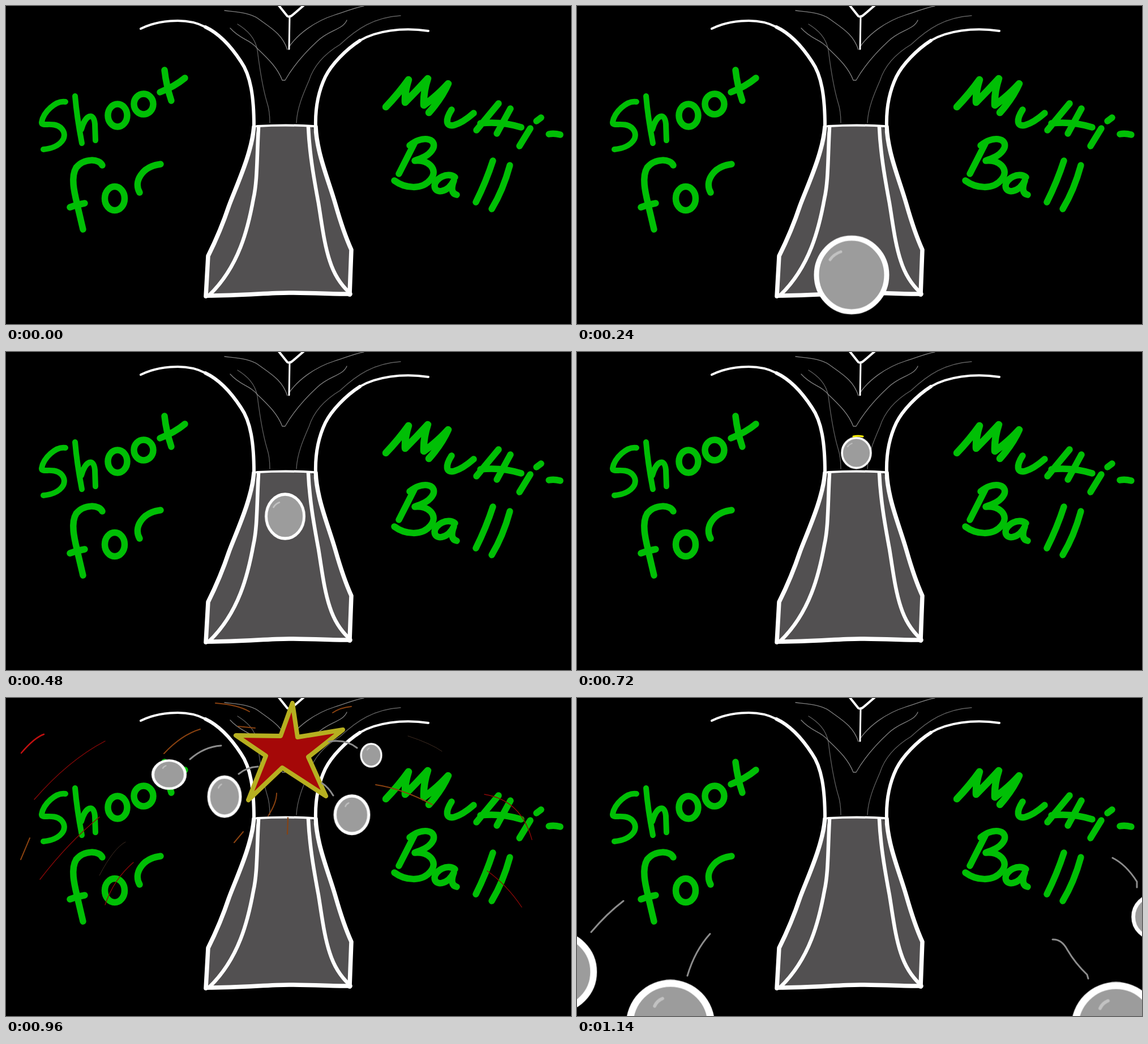
An HTML page without scripts that plays this animation: 998x561 px, repeating every 1.2 s.

```html
<!DOCTYPE html>
<html lang="en">
<head>
<meta charset="utf-8">
<title>Shoot for Multi-Ball</title>
<style>
html, body { margin: 0; width: 100%; height: 100%; overflow: hidden; background: #000; }
svg { display: block; width: 100%; height: 100%; fill: none; stroke-linecap: round; stroke-linejoin: round; }
.wall { stroke: #fff; }
.thin { stroke: #808080; stroke-width: 1.3; }
.ink { stroke: #00bf05; stroke-width: 11.5; }
.trail { stroke: #8c8c8c; stroke-width: 3; }
.body { fill: #9c9c9c; stroke: #fff; }
.shine { stroke: #c2c2c2; stroke-width: 5; }
.yellow { stroke: #fff200; }
.orange { stroke: #ff5a00; }
.brown { stroke: #8a4210; stroke-width: 2; }
.red { stroke: #8e0808; stroke-width: 1.3; }
.hot { fill: #f00; stroke: #ff0; stroke-width: 11; }
.warm { fill: #d20505; stroke: #dcd612; stroke-width: 9; }
.dim { fill: #a50808; stroke: #b6af20; stroke-width: 8; }

/* Each .at is visible for one 60 ms step, number --i of 20 */
.at { opacity: 0; animation: flash 1.2s step-end infinite; animation-delay: calc(var(--i) * 60ms - 1200ms); }
@keyframes flash { 0% { opacity: 1 } 5%, 100% { opacity: 0 } }

.move { animation: 1.2s step-end infinite; transform: scale(0); stroke-width: 9; }
.fly { stroke-width: 11; }
.roll { animation-name: roll; }
.l1 { animation-name: l1; }
.l2 { animation-name: l2; }
.r1 { animation-name: r1; }
.r2 { animation-name: r2; }
@keyframes roll {
  0%  { transform: scale(0) }
  5%  { transform: translate(484px, 636px) scale(1.25) }
  10% { transform: translate(484px, 580px) scale(1.16) }
  15% { transform: translate(484px, 526px) scale(1.08) }
  20% { transform: translate(485px, 474.5px) scale(1) }
  25% { transform: translate(487px, 424px) scale(.87, .88) }
  30% { transform: translate(489px, 376px) scale(.75, .78) }
  35% { transform: translate(491px, 332px) scale(.64, .69) }
  40% { transform: translate(493px, 290px) scale(.54, .6) }
  45% { transform: translate(493px, 256px) scale(.5, .55) }
  50% { transform: translate(493px, 226px) scale(.47, .5) }
  55% { transform: translate(493px, 200px) scale(.44, .45) }
  60% { transform: translate(493.5px, 178px) scale(.41) }
  65%, 100% { transform: scale(0) }
}
@keyframes l1 {
  0%  { transform: scale(0) }
  75% { transform: translate(385px, 118px) scale(.3) }
  80% { transform: translate(288px, 135px) scale(.46, .38) }
  85% { transform: translate(193px, 185px) scale(.62, .58) }
  90% { transform: translate(88px, 305px) scale(.82) }
  95%, 100% { transform: translate(-37px, 483px) scale(1.07, 1.03) }
}
@keyframes l2 {
  0%  { transform: scale(0) }
  75% { transform: translate(435px, 145px) scale(.3) }
  80% { transform: translate(386px, 174px) scale(.45, .53) }
  85% { transform: translate(322px, 240px) scale(.68) }
  90% { transform: translate(245px, 380px) scale(.92) }
  95%, 100% { transform: translate(165px, 576px) scale(1.16, 1.12) }
}
@keyframes r1 {
  0%  { transform: scale(0) }
  75% { transform: translate(560px, 160px) scale(.3) }
  80% { transform: translate(611px, 206px) scale(.48, .51) }
  85% { transform: translate(712px, 262px) scale(.7) }
  90% { transform: translate(828px, 395px) scale(.95) }
  95%, 100% { transform: translate(952px, 580px) scale(1.17, 1.12) }
}
@keyframes r2 {
  0%  { transform: scale(0) }
  75% { transform: translate(580px, 85px) scale(.2) }
  80% { transform: translate(645px, 101px) scale(.29, .31) }
  85% { transform: translate(765px, 120px) scale(.38) }
  90% { transform: translate(893px, 225px) scale(.48) }
  95%, 100% { transform: translate(1021px, 386px) scale(.62, .59) }
}
</style>
</head>
<body>
<svg viewBox="0 0 998 561" preserveAspectRatio="none">
  <defs>
    <ellipse id="disc" class="body" rx="62" ry="65"/>
    <g id="ball">
      <use href="#disc"/>
      <path class="shine" d="M-24 -29Q-21 -37 -12 -41"/>
    </g>
    <path id="star" d="M498 44L509 106L586 94L524 133L547 195L495 152L407 211L462 130L398 113L483 112Z"/>
    <path id="star2" d="M506 9L515 69L595 56L534 104L565 173L488 123L428 180L459 102L406 66L485 67Z"/>
    <g id="sparks" stroke-width="3">
      <path class="yellow" d="M407 44Q428 56 443 76M525 85Q542 68 565 57M328 117Q355 115 374 108M615 96Q630 88 647 85M571 210Q582 220 594 240M399 226Q392 246 372 264M489 30Q489 15 496 10"/>
      <path class="orange" d="M424 4Q444 27 460 62M549 57Q563 42 585 32M596 79Q615 72 636 60M333 176Q352 159 375 157M359 188Q375 174 397 166M430 157L460 150M541 141L555 148"/>
    </g>
  </defs>

  <!-- Ramp and tunnel -->
  <path fill="#525051" d="M445 212L436 240C430 268 407 317 394 352C382 388 370 415 357 441L353 512Q480 500 607 508L610 430C600 408 592 385 582 350C570 308 553 260 547 232L541 212Z"/>
  <path class="thin" d="M386 8C410 11 430 12 445 22C470 40 488 50 497 77M500 72C515 50 545 27 580 16C600 10 615 3 632 0"/>
  <path class="thin" d="M396 39C415 60 430 58 445 76C465 95 480 110 488 131H493C505 110 525 85 550 62C570 42 595 42 602 25"/>
  <path class="thin" opacity=".75" d="M409 32C425 42 440 55 444 78C448 110 455 150 461 170Q466 185 466 206M513 206C514 180 525 155 535 132C545 100 570 80 590 68C620 40 650 20 697 17"/>
  <g class="wall">
    <path stroke-width="4" d="M238 40C262 28 315 17 352 37M746 44C700 37 653 44 625 61M481 -2L497 18Q502 20 506 16L527 -2M443 212Q495 209 543 212"/>
    <path stroke-width="3" d="M501 18L500 76"/>
    <path stroke-width="6" d="M352 37C380 50 400 75 415 98C432 122 438 160 438 213M625 61C600 77 575 103 564 125C552 150 546 180 547 213"/>
    <path stroke-width="7.500" d="M438 213C434 260 408 315 394 352C382 388 370 415 357 441L353 512M547 213C549 260 570 308 582 350C592 385 600 408 610 430L607 509"/>
    <path stroke-width="6.500" d="M446 214C443 270 444 310 437 340C428 390 412 460 358 511M534 214C536 260 544 305 552 348C558 385 562 420 572 450C580 475 593 493 606 505"/>
    <path stroke-width="7.500" d="M354 511C420 511 460 506 500 506S580 508 608 508"/>
  </g>

  <!-- Hand lettering -->
  <g class="ink" role="img" aria-label="Shoot for Multi-Ball">
    <path stroke-width="10" d="M105 169C88 166 66 187 63 205C62 214 84 203 97 215C112 230 97 250 66 253"/>
    <path stroke-width="10" d="M122 159Q125 195 134 242M133 218C140 192 155 186 157 208L158 237"/>
    <ellipse cx="197" cy="193" rx="17" ry="20"/>
    <ellipse cx="243" cy="173" rx="17" ry="18"/>
    <path d="M280 113Q283 140 292 167M272 152Q298 142 316 127"/>
    <path d="M170 281C165 269 138 268 124 285C112 305 124 340 128 360L136 394M113 355Q127 350 139 348"/>
    <ellipse cx="192" cy="339.500" rx="17.500" ry="21"/>
    <path d="M236 329C225 310 240 283 273 279"/>
    <path stroke-width="12.500" d="M671 178Q693 155 711 130Q704 152 705 170Q725 150 745 128Q737 152 738 175Q760 160 781 137Q770 162 747 188"/>
    <path d="M787 183C776 200 776 214 792 210C806 206 818 196 826 189M870 172L831 219M891 181L867 225M838 207Q875 203 910 214"/>
    <path d="M926 216L907 247M937 203L945 197M959 226Q968 224 979 227"/>
    <path d="M722 241L694 296M713 246C735 228 760 233 755 250C748 266 728 270 722 273C745 270 765 288 750 306C735 325 705 322 686 308"/>
    <path d="M793 302C780 292 758 304 757 317C757 332 780 330 791 308Q783 330 796 333"/>
    <path d="M860 273Q848 310 830 346M890 281Q878 325 858 358"/>
  </g>

  <!-- Ball up the ramp -->
  <g class="move roll">
    <use href="#disc"/>
    <path class="shine" d="M-38 -27Q-31 -37 -19 -41"/>
  </g>
  <path class="at yellow" style="--i:12" stroke-width="3" d="M488 149Q496 147 505 149"/>

  <!-- Burst -->
  <g class="at" style="--i:13">
    <use href="#star" class="hot" transform="translate(247 70) scale(.5)"/>
  </g>
  <g class="at" style="--i:14">
    <use href="#sparks"/>
    <use href="#star" class="hot"/>
  </g>
  <g class="at" style="--i:15">
    <use href="#sparks" transform="translate(-248 -65) scale(1.5)" opacity=".8"/>
    <use href="#star2" class="warm" transform="translate(0 10)"/>
  </g>
  <g class="at" style="--i:16">
    <use href="#star2" class="dim"/>
    <path class="red" d="M50 179Q110 110 175 76M60 320Q110 255 165 210M175 365Q190 320 225 290M845 170Q910 180 929 250M850 305Q885 330 911 369"/>
    <path stroke="#c01010" stroke-width="2.500" d="M27 97Q50 70 67 64"/>
    <path class="brown" d="M653 153Q700 160 753 188M279 98Q310 65 343 55M26 285L42 247M403 255L419 236M463 208Q478 185 478 168M498 211L497 240M370 9Q410 12 430 24M577 26Q590 17 610 15M410 50L440 53"/>
    <path stroke="#3c2a20" d="M710 67Q750 80 770 94M165 313Q190 265 211 254"/>
  </g>
  <g class="at" style="--i:17">
    <use href="#star2" class="dim" opacity=".4"/>
  </g>

  <!-- Flying balls -->
  <g class="trail">
    <path class="at" style="--i:16" d="M325 108Q350 86 380 84M411 134Q425 122 445 121M558 150Q570 158 578 172M570 77Q600 72 620 88"/>
    <path class="at" style="--i:17" d="M240 148Q265 130 297 122M359 192Q370 174 390 165M634 210Q655 212 672 225M680 93Q712 86 738 103"/>
    <path class="at" style="--i:18" d="M140 249Q165 217 195 201M271 307Q285 270 305 250M735 291Q765 310 782 342M815 155Q850 165 868 195"/>
    <path class="at" style="--i:19" d="M82 358Q53 380 25 413M235 416Q208 446 195 490M840 426Q856 425 866 444Q880 468 901 488L903 495M946 282Q970 294 989 324V334"/>
  </g>
  <use href="#ball" class="move fly l1"/>
  <use href="#ball" class="move fly l2"/>
  <use href="#ball" class="move fly r1"/>
  <use href="#ball" class="move fly r2"/>
</svg>
</body>
</html>
```
